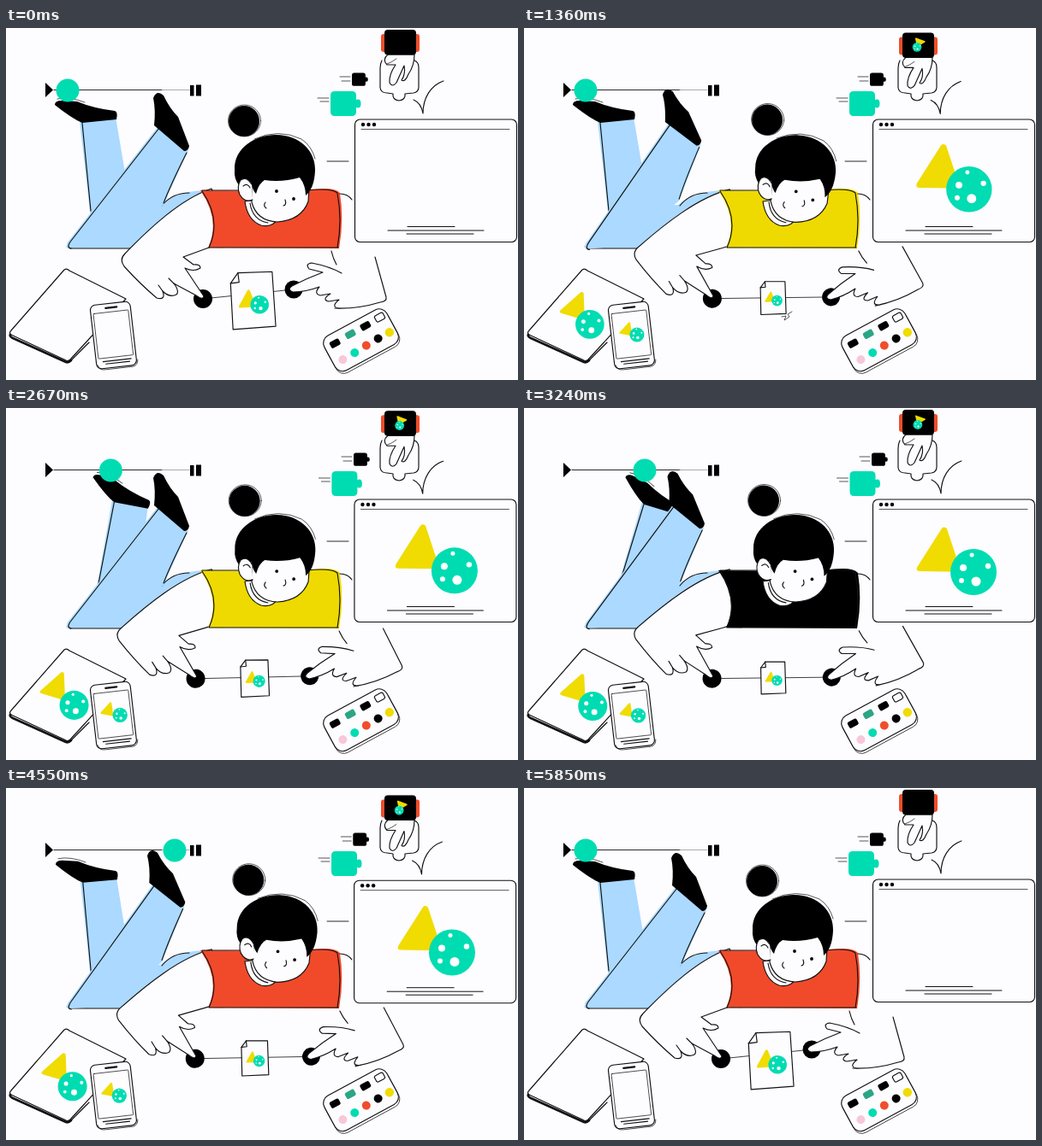
Animation, 598 px wide and 412 px high, one loop 5880 ms. Source, as an HTML page:

```html
<!DOCTYPE html>
<html lang="en">
<head>
<meta charset="utf-8">
<title>Creative desk</title>
<style>
html, body { margin: 0; width: 100%; height: 100%; overflow: hidden; background: #fdfcff; }
svg { display: block; width: 598px; height: 412px; }
.ink { fill: none; stroke: #111; stroke-width: 1.15; stroke-linecap: round; stroke-linejoin: round; }
.thin { stroke-width: .7; }
.paper { fill: #fdfcff; }
.black { fill: #000; stroke: none; }
.blue { fill: #abd9ff; stroke: none; }
.teal { fill: #00dcb2; stroke: none; }
.yellow { fill: #f0dc00; stroke: none; }
.red { fill: #f04d2b; stroke: none; }
.spot { fill: #fff; stroke: none; }
</style>
</head>
<body>
<svg viewBox="0 0 598 412" class="ink">
  <defs>
    <path id="tri" class="yellow" d="M-1,-26 Q2,-29 5,-26 L22,20 Q23,24 19,24 L-25,25 Q-30,25 -28,20 Z"/>
    <g id="moon">
      <circle class="teal" r="27"/>
      <g class="spot">
        <circle cx="-12" cy="-5" r="4"/><circle cx="-2" cy="-20" r="2.5"/><circle cx="17" cy="-7" r="3.2"/>
        <circle cx="3" cy="11" r="5.5"/><circle cx="-14" cy="10" r="3"/>
      </g>
    </g>
    <path id="piece" d="M5,0 H25 Q30,0 30,5 V10 Q35.500,8 35.500,14.500 Q35.500,21 30,19 V24 Q30,29 25,29 H5 Q0,29 0,24 V5 Q0,0 5,0 Z"/>
  </defs>

  <!-- player -->
  <path class="black" d="M46,64 L55,72.500 L46,81 Z M215,67 h4.500 v12.500 h-4.500 Z M222,66.500 h6 v13 h-6 Z"/>
  <path d="M56,72.500 H182" stroke-width=".9"/>
  <path d="M182,72.500 H214" stroke="#888" stroke-width=".7"/>

  <!-- legs -->
  <g id="backLeg">
    <path class="blue" d="M86,109 L128,104 L140,175 L125,240 H105 L98,215 Z"/>
    <path d="M89,111 L99,214"/>
    <path class="thin" d="M60,83 Q74,80 92,87"/>
    <path class="black" d="M57,90 Q57,85 65,85 L83,86 Q102,94 127,97 Q131,98 129,107 L89,111 Q77,106 57,90 Z"/>
  </g>
  <path class="blue" d="M70,256 L110,210 L180,207 Q198,192 230,190 L241,200 L175,258 H72 Z"/>
  <path d="M182,208 Q194,193 214,193 M75,258 H152"/>
  <g id="frontLeg">
    <path class="blue" d="M177,116 L213,143 L184,207 L120,256 L72,257 Q69,253 75,247 Z"/>
    <path d="M179,117 L76,249 Q70,257 76,258"/>
    <path d="M211,146 Q192,184 184,205"/>
    <path class="black" d="M172,82 Q176,72 184,79 Q191,94 201,104 L214,138 Q213,144 208,144 L173,114 Q175,96 172,82 Z"/>
  </g>
  <circle id="ball" class="teal" r="13.500"/>

  <!-- stretching page -->
  <path id="rod" stroke-width=".8"/>
  <g id="page">
    <path class="paper" vector-effect="non-scaling-stroke" d="M-17,-33 L23,-33 L25,31 L-25,33 L-26,-21 Z"/>
    <path vector-effect="non-scaling-stroke" d="M-26,-21 L-16,-22 L-17,-33"/>
    <use href="#tri" transform="translate(-6 -2) scale(.4)"/>
    <use href="#moon" transform="translate(7 5) scale(.4)"/>
  </g>
  <path id="spark" class="thin" d="M301,338 L306,337 L304,342 L310,338 L308,335 L313,332"/>

  <!-- arms -->
  <g id="leftArm">
    <circle class="black" cx="230" cy="317" r="11"/>
    <path class="paper" d="M240,188 C204,200 167,235 139,264 Q132,271 138,279 Q157,300 176,316 Q187,319 183,308 Q191,316 199,312 Q203,308 196,299 L222,313 Q230,319 231,314 L209,281 Q219,286 227,281 Q227,276 219,277 L207,268 L237,257 L262,247 Z"/>
    <path d="M183,308 L178,301 M196,299 L190,293"/>
  </g>
  <g id="rightArm">
    <circle class="black" cx="336" cy="306" r="10.500"/>
    <path class="paper" stroke="none" d="M380,240 L386,276 L360,290 L380,326 L442,319 L430,240 Z"/>
    <path d="M380,261 Q382,270 386,277 M431,268 L444,315 Q445,320 437,321 Q411,329 384,328"/>
    <path class="paper" d="M392,287 Q378,279 357,275 Q349,276 354,282 L370,286 Q351,293 334,302 Q328,306 335,309 Q350,309 366,303 Q359,311 367,313 L379,311 Q368,318 377,320 L389,318 Q378,327 390,328"/>
  </g>

  <!-- torso -->
  <path id="shirt" stroke="none" d="M227,190 Q300,191 352,190 Q383,185 390,193 Q395,225 389,258 L236,257 Q251,225 227,190 Z"/>
  <path d="M229,191 Q252,224 237,257 H388 M229,190 H275 M351,190 Q380,187 387,193 Q393,225 387,257 M390,194 Q399,194 404,201"/>

  <!-- head -->
  <path class="paper" d="M279,203 Q282,225 298,231 Q312,234 318,222 L300,200 Z"/>
  <g id="head">
    <circle class="black" cx="278" cy="109" r="18"/>
    <ellipse class="thin" cx="278.500" cy="108.500" rx="19" ry="18.500"/>
    <path class="paper" d="M287,178 L287,204 Q293,226 317,227 Q345,225 353,203 L355,170 Z"/>
    <path d="M285,205 Q288,225 306,228"/>
    <path class="black" d="M267,166 C266,140 292,125 315,125 C344,125 362,145 361,167 Q360,188 350,196 Q350,184 343,175 Q322,181 302,178 Q295,182 292,194 Q288,190 286,180 L272,184 Q266,176 267,166 Z"/>
    <path class="thin" d="M290,130 Q318,117 345,130 Q357,138 361,153"/>
    <path class="paper" d="M287,183 Q281,173 274,178 Q269,186 273,195 Q279,205 288,201"/>
    <path d="M277,185 Q282,181 285,187"/>
    <circle class="black" cx="316" cy="191" r="1.900"/><circle class="black" cx="336" cy="200" r="1.900"/>
    <path d="M303,204 Q300,208 304,211 M326,201 Q328,207 324,208"/>
  </g>

  <!-- tablet, phone -->
  <path class="paper" d="M68,283 Q71,281 74,284 L140,317 L75,388 Q72,391 68,388 L6,359 Q3,357 6,354 Z"/>
  <path d="M5,359 Q4,361 8,363 L70,391 Q73,392 76,389" stroke-width="2.800"/>
  <path d="M76,389 L97,368"/>
  <g class="icons" transform="translate(68 334)">
    <g class="tri" data-at="-6 -10"><use href="#tri" transform="rotate(18) scale(.6)"/></g>
    <g class="moon" data-at="9 13"><use href="#moon" transform="scale(.63)"/></g>
  </g>
  <g transform="rotate(-6.500 126 360)">
    <rect class="paper" x="102" y="322" width="47" height="75" rx="6"/>
    <path d="M103,392 Q105,399 112,398.500 H144 Q150,398 150.500,391" class="thin"/>
    <rect class="thin" x="105" y="332" width="41" height="53" rx="1"/>
    <path d="M120,327 H133" stroke-width="2.200"/>
    <path d="M110,389 H143 M113,392 H141"/>
  </g>
  <g class="icons" transform="translate(126 356)">
    <g class="tri" data-at="-5 -4"><use href="#tri" transform="rotate(12) scale(.3)"/></g>
    <g class="moon" data-at="6 3"><use href="#moon" transform="scale(.32)"/></g>
  </g>

  <!-- palette -->
  <g transform="translate(415 365) rotate(-28.500)">
    <rect x="-42" y="-19" width="83" height="45" rx="10" class="thin"/>
    <rect class="paper" x="-42" y="-23" width="83" height="46" rx="10"/>
    <rect class="black" x="-35" y="-15" width="12" height="8" rx="2"/>
    <rect x="-14" y="-16" width="12" height="8" rx="2" fill="#2aa685" stroke="none"/>
    <rect class="black" x="6" y="-16" width="12" height="8" rx="2"/>
    <rect x="26" y="-17" width="11" height="8" rx="2"/>
    <g stroke="none">
      <circle cx="-30" cy="10" r="5" fill="#f6c8d8"/><circle class="teal" cx="-14" cy="9.500" r="5"/>
      <circle class="red" cx="2" cy="8.500" r="5"/><circle class="black" cx="18" cy="8" r="5"/>
      <circle class="yellow" cx="33" cy="8" r="5.200"/>
    </g>
  </g>

  <!-- browser -->
  <g id="browser">
    <rect class="paper" x="407.500" y="107" width="189" height="143.500" rx="6"/>
    <g class="black"><circle cx="417" cy="113" r="2.200"/><circle cx="423.500" cy="113" r="2.200"/><circle cx="430" cy="113" r="2.200"/></g>
    <path class="thin" d="M415,118.500 H588"/>
    <path stroke-width="1" d="M469,232.500 H524 M446,237 H558 M468,241 H546"/>
  </g>
  <g class="icons" transform="translate(505 170)">
    <g class="tri" data-at="-18 -7"><use href="#tri" transform="rotate(2)"/></g>
    <g class="moon" data-at="15 19"><use href="#moon"/></g>
  </g>
  <path d="M375,156 H400" stroke-width=".9"/>

  <!-- puzzle pieces and watch -->
  <g id="greenPiece">
    <use href="#piece" class="teal" transform="translate(379 74)"/>
    <path class="thin" d="M364,82 H377 M367,86 H377"/>
  </g>
  <g id="blackPiece">
    <use href="#piece" class="black" transform="translate(404 52.500) scale(.53)"/>
    <path class="thin" d="M390,57 H402 M392,62 H402"/>
  </g>
  <path class="paper" d="M439,38 Q437,42 437,47 V70 Q438,76 445,76 L452,77 Q451,84 459,85 Q467,84 466,77 L476,76 Q482,75 482,69 V46 Q482,40 477,38"/>
  <path id="tick" d="M511,62 C496,67 487,82 487,100 Q485,88 476,84"/>
  <g id="watch">
    <path class="paper" d="M446,31 Q439,37 445,43 L455,43 Q447,55 448,64 Q451,70 456,64 L465,44 Q467,54 462,61 Q466,64 470,54 Q477,44 477,31 Z"/>
    <path class="thin" d="M445,42 Q451,40 456,36"/>
    <rect class="red" x="438" y="7" width="45" height="21" rx="3"/>
    <rect class="black" x="442" y="2" width="37" height="29.500" rx="4"/>
    <g class="icons" transform="translate(461 16)">
      <g class="tri" data-at="2 -3"><use href="#tri" transform="rotate(80) scale(.21)"/></g>
      <g class="moon" data-at="-2 3"><use href="#moon" transform="scale(.2)"/></g>
    </g>
  </g>
</svg>
<script>
const LOOP = 5880, BEAT = LOOP / 2;
const $ = id => document.getElementById(id);
const move = (el, value) => el.setAttribute('transform', value);
const ease = p => p * p * (3 - 2 * p);

// keys: time, value, time, value, ...
function track(t, keys) {
  for (let i = 0; i < keys.length - 2; i += 2)
    if (t < keys[i + 2]) {
      const p = Math.max(0, (t - keys[i]) / (keys[i + 2] - keys[i]));
      return keys[i + 1] + (keys[i + 3] - keys[i + 1]) * ease(p);
    }
  return keys[keys.length - 1];
}

const SPREAD = [0, 0, 250, 0, 1000, 1, 1360, .96, 2250, .64, 3150, 1, 4080, .72, 4950, 1, 5250, .9, 5800, 0];
const GROW = [780, 0, 1400, 1, 4950, 1, 5500, 0];
const HEAD = [0, 0, .1, .33, .37, .95, .46, 1, .73, .42, 1, 0];
const TAP = [0, 0, .1, .45, .37, .85, .46, 1, .7, 0, 1, 0];
const PRESS = [0, 0, .37, 0, .55, 1, .78, 1, .96, 0];
const TRI_X = [1360, 0, 2180, -6, 3240, 1, 4030, 0];
const TRI_Y = [1360, 0, 2180, -2, 3240, 4, 4030, 2, 5060, 3];
const MOON_X = [1360, 0, 2180, 3, 3240, 5, 4030, 3, 5060, -1];
const MOON_Y = [1360, 0, 2180, 0, 3240, 3, 4030, 5, 5060, 2];

const icons = [...document.querySelectorAll('.icons')].map(el => {
  const [tri, moon] = ['.tri', '.moon'].map(c => {
    const part = el.querySelector(c);
    return { part, at: part.dataset.at.split(' ').map(Number) };
  });
  const size = Math.hypot(moon.at[0] - tri.at[0], moon.at[1] - tri.at[1]) / 42;
  return { el, base: el.getAttribute('transform'), tri, moon, size };
});

function turn(angle, x, y, px, py) {
  const a = angle * Math.PI / 180, c = Math.cos(a), s = Math.sin(a);
  return [px + (x - px) * c - (y - py) * s, py + (x - px) * s + (y - py) * c];
}

function drawBall(t) {
  let x = track(t, [1650, 72, 3200, 141]), y = 73;
  if (t > 3900) {
    const p = Math.min(1, (t - 3900) / 650);
    x = 141 + 56 * p;
    y -= 96 * p * (1 - p);
  }
  if (t > 5200) x = track(t, [5200, 197, 5800, 72]);
  move($('ball'), `translate(${x} ${y})`);
}

function drawHands(t) {
  const s = track(t, SPREAD), left = 4.8 * s, right = -14 * s;
  move($('leftArm'), `rotate(${left} 229 191)`);
  move($('rightArm'), `rotate(${right} 385 215)`);
  $('rod').setAttribute('d', `M${turn(left, 230, 317, 229, 191)} L${turn(right, 336, 306, 385, 215)}`);
  move($('page'), `translate(${289 + 2.5 * s} ${319 - 3 * s}) rotate(${-2 + 2 * s}) scale(${1 - .43 * s})`);
  $('spark').style.display = t > 1300 && t < 1480 ? '' : 'none';
}

function drawIcons(t) {
  const grow = track(t, GROW);
  const triAt = [track(t, TRI_X), track(t, TRI_Y)], moonAt = [track(t, MOON_X), track(t, MOON_Y)];
  const place = ({ part, at }, by, k) => move(part, `translate(${at[0] + by[0] * k} ${at[1] + by[1] * k})`);
  for (const { el, base, tri, moon, size } of icons) {
    move(el, `${base} scale(${grow})`);
    el.setAttribute('opacity', grow);
    place(tri, triAt, size);
    place(moon, moonAt, size);
  }
}

function draw(t) {
  const beat = t % BEAT / BEAT;
  const press = track(beat, PRESS);
  drawBall(t);
  drawHands(t);
  drawIcons(t);
  move($('backLeg'), `rotate(${track(t, [1650, 0, 3200, 22.5, 3750, 22.5, 3900, 23, 4030, 18, 4600, 0])} 110 240)`);
  move($('frontLeg'), `rotate(${-3.4 * track(beat, TAP)} 100 250)`);
  move($('head'), `rotate(${3 * track(beat, HEAD)} 310 225)`);
  move($('watch'), `translate(0 ${6.5 * press})`);
  move($('tick'), `translate(${-1.5 * press} ${press})`);
  move($('blackPiece'), `translate(${track(t, [1360, 0, 2180, 2, 3240, 2, 4030, 0, 5060, 2.5, 5800, 0])} 0)`);
  move($('greenPiece'), `translate(${track(t, [0, 0, 1360, 1, 3240, 1.5, 4030, 0, 5060, 2, 5800, 0])} 0)`);
  move($('browser'), `translate(${track(t, [1360, 0, 2180, -1, 3240, 0, 4030, .3, 5060, -2, 5800, 0])} ${track(t, [3240, 0, 4030, 1.2, 5060, 1.2, 5800, 0])})`);
  $('shirt').setAttribute('fill', t < 980 || t >= 3640 ? '#f04a2b' : t < 2700 ? '#eeda00' : '#000');
}

const start = performance.now();
function tick(now) {
  draw(Math.max(0, now - start) % LOOP);
  requestAnimationFrame(tick);
}
draw(0);
requestAnimationFrame(tick);
</script>
</body>
</html>
```
